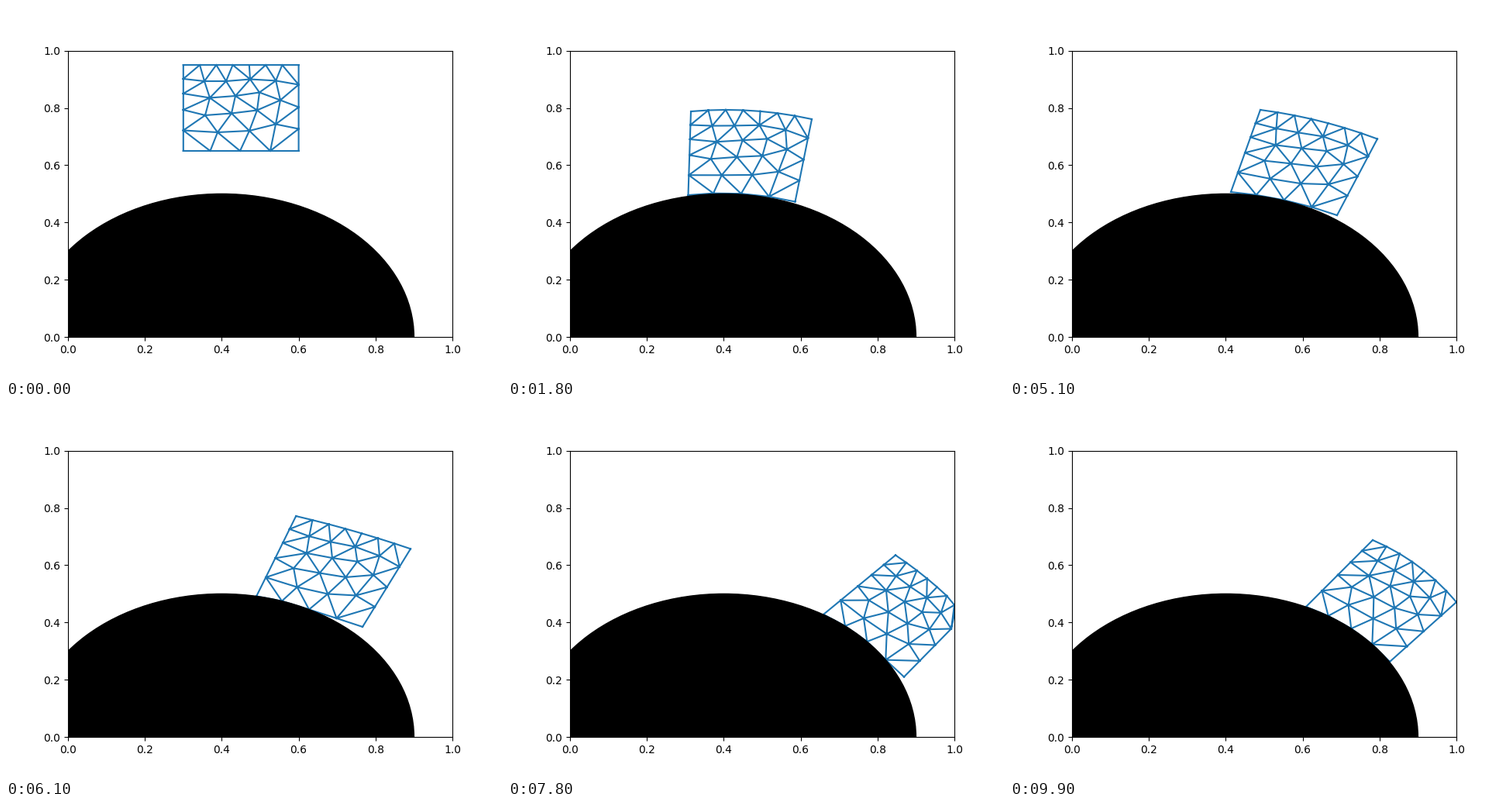
These frames come from a looping animation (640 px wide and 480 px high, 10 s). A matplotlib script:

```python
import numpy as np
import matplotlib.pyplot as plt
from matplotlib.animation import FuncAnimation
from matplotlib.tri import Triangulation, TriAnalyzer

FRAMES = 100
GRAVITY = 0.62      # pixels per frame squared
DROP = 55.4         # pixels from the start down to the hill
T_HIT = (2 * DROP / GRAVITY) ** 0.5


def to_data(z):
    return (z.real - 80) / 496, (427.2 - z.imag) / 369.6


# Block at rest, in stage pixels: top, left, bottom, right, inside
LEFT, TOP, WIDTH, HEIGHT = 228.8, 76.08, 148.8, 110.88
RIGHT, BOTTOM = LEFT + WIDTH, TOP + HEIGHT
rest = np.concatenate([
    np.linspace(LEFT, RIGHT, 8) + 1j * TOP,
    LEFT + 1j * np.array([94, 113, 134, 160.5]),
    np.array([LEFT, 263.5, 302, 341, RIGHT]) + 1j * BOTTOM,
    RIGHT + 1j * np.array([101.5, 130.5, 158.5]),
    [256 + 97j, 284 + 97j, 315 + 94.5j, 348.2 + 96.4j],
    [263 + 118.5j, 296 + 116j, 327 + 111.5j, 354 + 121.5j],
    [257 + 141j, 291 + 138.5j, 324 + 134.5j],
    [273 + 163j, 314 + 161j, 348 + 152.5j],
])
u = (rest.real - LEFT) / WIDTH
v = (rest.imag - TOP) / HEIGHT

mesh = Triangulation(*to_data(rest))
mesh.set_mask(TriAnalyzer(mesh).get_flat_tri_mask())
edges = mesh.edges


def bent(tl, tr, bl, br, arch):
    """Block spread between four corners and arched away from the hill."""
    flat = (1 - v) * ((1 - u) * tl + u * tr) + v * ((1 - u) * bl + u * br)
    up = -1j * (tr - tl) / abs(tr - tl)
    return flat + arch * 4 * u * (1 - u) * up


# Hit, three landings, slide, push into the wall, push back
times = np.array([T_HIT, 18, 36, 51, 70, 78, 99])
poses = np.array([
    rest + 1j * DROP,
    bent(236 + 136j, 392 + 146j, 232.5 + 244j, 370.5 + 252.5j, 6),
    bent(267 + 136j, 419 + 153j, 250 + 241j, 399 + 259j, 4.5),
    bent(323 + 134j, 474 + 171.5j, 285 + 240j, 422 + 270j, 4.5),
    bent(448 + 163j, 576 + 219j, 375 + 257j, 502 + 315j, 0.5),
    bent(500 + 192.5j, 590 + 269j, 407 + 269j, 511 + 349.5j, 3.5),
    bent(468 + 173j, 576 + 253j, 382 + 259j, 490 + 330j, 8),
])

# The block sticks for a moment at each landing, then flows on
speeds = np.gradient(poses, times, axis=0)
speeds[0] = 1j * GRAVITY * T_HIT
speeds[[1, 2, 3, -1]] = 0

HOPS = [(18, 34.5), (36, 46.3), (51, 59)]


def nodes_at(t):
    if t < T_HIT:
        return rest + 0.5j * GRAVITY * t ** 2
    k = min(np.searchsorted(times, t, side="right") - 1, len(times) - 2)
    h = times[k + 1] - times[k]
    s = (t - times[k]) / h
    ease = s * s * (3 - 2 * s)
    z = poses[k] + ease * (poses[k + 1] - poses[k])
    z = z + h * s * (1 - s) * ((1 - s) * speeds[k] - s * speeds[k + 1])
    if k == 0:      # squash on the first impact
        z = z + 0.28 * s * (1 - s) * (z.real - z.real.mean())
    for start, end in HOPS:
        if start < t < end:
            z = z - 0.5j * GRAVITY * (t - start) * (end - t)
    return z


def collide(x, y):
    """Push nodes out of the hill and keep them left of the wall."""
    grow = np.maximum(1, 0.5 / np.hypot(x - 0.4, y))
    return np.minimum(0.4 + (x - 0.4) * grow, 1), y * grow


def strokes(a):
    return np.column_stack([a[edges], np.full(len(edges), np.nan)]).ravel()


fig, ax = plt.subplots(figsize=(6.4, 4.8), dpi=100)
ax.set_xlim(0, 1)
ax.set_ylim(0, 1)
ax.add_patch(plt.Circle((0.4, 0), 0.5, color="black", zorder=2.2))
line, = ax.plot([], [], color="C0", lw=1.5)


def update(i):
    x, y = collide(*to_data(nodes_at(i)))
    line.set_data(strokes(x), strokes(y))
    return line,


anim = FuncAnimation(fig, update, frames=FRAMES, interval=100, repeat=True)
plt.show()
```
